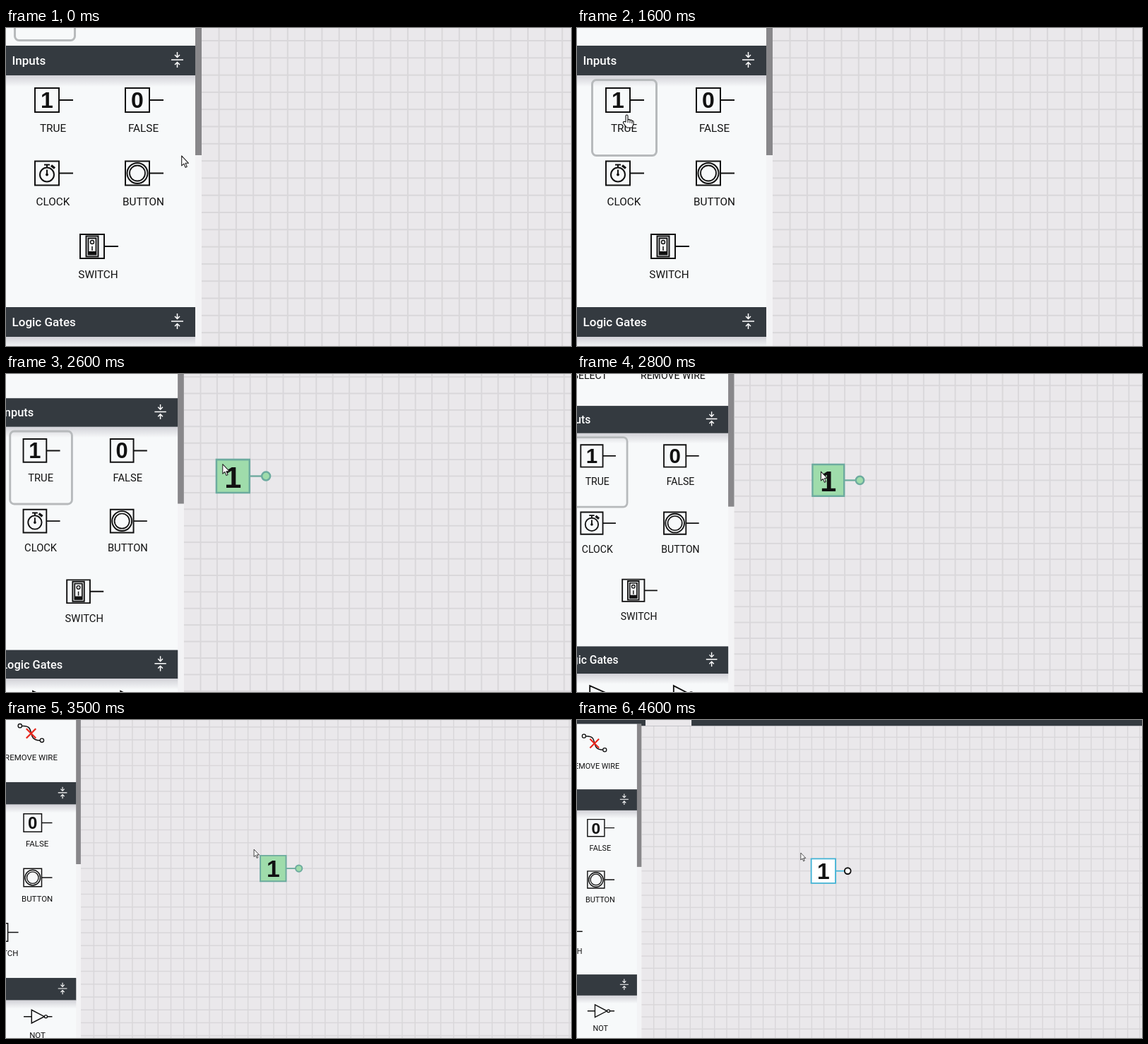
Recreate the animation shown at these times as an HTML page with a canvas. Size 800x450 px, loop 4700 ms.

```html
<!DOCTYPE html>
<html lang="en">
<head>
<meta charset="utf-8">
<title>Logic simulator</title>
<style>
  html, body { margin: 0; width: 100%; height: 100%; overflow: hidden; }
  canvas { display: block; width: 800px; height: 450px; }
</style>
</head>
<body>
<canvas id="stage" width="800" height="450"></canvas>
<script>
const ctx = document.getElementById('stage').getContext('2d');
const LOOP = 4700, CELL = 24.3, GRID_X = 398.8, GRID_Y = 115.2;
const SELECT_AT = 1500, RELEASE_AT = 3420, PLACE_AT = 3950;
const INK = '#111', DARK = '#343a40', PANEL = '#f7f9fa';

// Keyframes: time, then values
const zoomKeys = [[2430, 1], [2800, .92], [3200, .83], [3500, .749], [3670, .708]];
const cursorKeys = [
  [0, 249, 181], [300, 160, 142], [600, 75, 122], [700, 70.5, 123],
  [1800, 70.5, 123], [2100, 112, 118], [2400, 257, 118], [2800, 410.4, 126],
  [3200, 568.6, 149], [3400, 608, 154], [3500, 604.5, 152],
  [4000, 604.5, 152], [4300, 595.6, 152]
];

function at(keys, t) {
  if (t <= keys[0][0]) return keys[0].slice(1);
  for (let i = 1; i < keys.length; i++) {
    const a = keys[i - 1], b = keys[i];
    if (t < b[0]) {
      const p = (t - a[0]) / (b[0] - a[0]);
      return a.slice(1).map((v, k) => v + (b[k + 1] - v) * p);
    }
  }
  return keys[keys.length - 1].slice(1);
}

function fill(color, x, y, w, h) {
  ctx.fillStyle = color;
  ctx.fillRect(x, y, w, h);
}

function path(d, stroke, width = 2, inside) {
  const p = new Path2D(d);
  if (inside) { ctx.fillStyle = inside; ctx.fill(p); }
  if (stroke) { ctx.strokeStyle = stroke; ctx.lineWidth = width; ctx.stroke(p); }
}

function circle(x, y, r, stroke, width, inside) {
  ctx.beginPath();
  ctx.arc(x, y, r, 0, 7);
  if (inside) { ctx.fillStyle = inside; ctx.fill(); }
  ctx.strokeStyle = stroke;
  ctx.lineWidth = width;
  ctx.stroke();
}

function text(s, x, y, font, color = INK, align = 'center') {
  ctx.font = font;
  ctx.fillStyle = color;
  ctx.textAlign = align;
  ctx.fillText(s, x, y);
}

const label = (s, x, y) => text(s, x, y, '15.3px Roboto, sans-serif');
const digit = (s, x, y, size) =>
  text(s, x, y + size * .358, `bold ${size}px "Liberation Sans", Arial, sans-serif`);

function selection(x, y, w) {
  ctx.beginPath();
  ctx.roundRect(x, y, w, 107, 6);
  ctx.strokeStyle = '#b7babc';
  ctx.lineWidth = 3;
  ctx.stroke();
}

function drawGrid() {
  fill('#eae8eb', 277, -102, 1100, 1000);
  for (let x = GRID_X - 4 * CELL; x < 1300; x += CELL) fill('#d9d7da', x - 1, -102, 2, 1000);
  for (let y = GRID_Y - 8 * CELL; y < 800; y += CELL) fill('#d9d7da', 277, y - 1, 1100, 2);
}

function header(s, y) {
  const g = ctx.createLinearGradient(0, y + 42, 0, y + 58);
  g.addColorStop(0, 'rgba(60,50,75,.2)');
  g.addColorStop(1, 'rgba(60,50,75,0)');
  fill(g, 0, y + 42, 268, 16);
  fill(DARK, 0, y, 268, 42);
  text(s, 8.5, y + 27, '500 17px Roboto, sans-serif', '#fff', 'left');
  path(`M234 ${y + 20}H251M242.5 ${y + 9}V${y + 16}M239 ${y + 13}l3.5 3.5 3.5-3.5` +
    `M242.5 ${y + 31}V${y + 24}M239 ${y + 27}l3.5-3.5 3.5 3.5`, '#fff', 1.5);
}

// Boxed symbol with an output lead; x, y is the box centre
function input(name, x, y, symbol) {
  path(`M${x - 17} ${y - 17}h34v34h-34zM${x + 17} ${y}h20`, INK, 2);
  symbol(x, y);
  label(name, x + 8.5, y + 45);
}

function clock(x, y) {
  circle(x, y + 2, 10, INK, 2);
  circle(x, y + 2, 1.2, INK, 1.5, INK);
  path(`M${x} ${y + 2}v-7M${x} ${y - 8}v-3M${x - 4} ${y - 12}h8`, INK, 2);
  path(`M${x + 6} ${y - 11}l5 4`, INK, 3.5);
}

function button(x, y) {
  circle(x, y, 14.5, INK, 2);
  circle(x, y, 11, INK, 1.8);
}

function toggle(x, y) {
  path(`M${x - 8.5} ${y - 14.5}h17v29h-17z`, INK, 2);
  path(`M${x - 5.5} ${y - 11.5}h11v23h-11z`, INK, 1.8);
  circle(x, y - 6, 2.5, INK, 1.4);
  path(`M${x} ${y}v6`, INK, 1.5);
  fill(INK, x - 5.5, y + 7, 11, 5);
}

function gate(x, inverted) {
  const y = 468, tip = inverted ? x + 13 : x + 17;
  path(`M${x - 26} ${y}h15M${x + 17} ${y}h11M${x - 11} ${y - 12.5}L${tip} ${y}L${x - 11} ${y + 12.5}z`, INK, 2);
  if (inverted) circle(x + 16, y, 2.7, INK, 1.8, PANEL);
}

function drawSidebar(t) {
  fill(PANEL, 0, -106, 268, 1000);
  fill('#f3f3f5', 268, -106, 9, 1000);
  fill('#88878a', 268, -106, 9, 286);

  label('SELECT', 55, -16);
  label('REMOVE WIRE', 183, -16);
  path('M165 -81C194 -84 172 -54 200 -54', INK, 2);
  circle(162, -81.5, 3.6, INK, 1.8, PANEL);
  circle(203.5, -54, 3.6, INK, 1.8, PANEL);
  path('M174 -76l18 18M192 -76l-18 18', '#e8261c', 3);

  header('Inputs', 25);
  if (t < SELECT_AT) selection(12.5, -89.5, 85);
  else selection(21.5, 73.5, 91);
  input('TRUE', 58, 102, (x, y) => digit('1', x, y, 32));
  input('FALSE', 186, 102, (x, y) => digit('0', x, y, 32));
  input('CLOCK', 58, 205.5, clock);
  input('BUTTON', 186, 205.5, button);
  input('SWITCH', 122, 309, toggle);

  header('Logic Gates', 395);
  gate(66, false);
  gate(195, true);
  label('NOT', 195, 508);
}

function drawTopBar() {
  fill(DARK, 0, -200, 277, 94);
  fill(DARK, 277, -200, 1100, 98);
  fill('#eae8eb', 285, -200, 92, 98);
}

const snap = (v, base) => base + Math.round((v - base) / CELL) * CELL;

// The new part follows the pointer in grid steps until it is dropped
function drawPart(t) {
  const [cx, cy] = at(cursorKeys, Math.min(t - 40, RELEASE_AT));
  if (t < 2400 || cx < 285) return;
  const x = snap(cx, GRID_X) - 1, y = snap(cy, GRID_Y);
  const size = 2 * CELL, mid = y + CELL, placed = t >= PLACE_AT;
  const line = placed ? '#43b4d6' : '#6dab9f';
  const body = placed ? '#fff' : '#9fdcab';
  path(`M${x + size} ${mid}h${CELL - 6}`, line, 2.4);
  path(`M${x} ${y}h${size}v${size}h${-size}z`, line, 2.6, body);
  digit('1', x + CELL, mid + .5, 45);
  circle(x + 3 * CELL, mid, 6.2, placed ? INK : line, 2.6, body);
}

function drawCursor(t) {
  const [x, y] = at(cursorKeys, t);
  const overItem = y > 72 && y < 182 && (x > 20 && x < 114 || x > 148 && x < 242);
  ctx.save();
  ctx.translate(x, y);
  ctx.lineJoin = 'round';
  if (overItem) {
    path('M-1.5 10V1.5Q-1.5 0 0 0T1.5 1.5V7Q4 5.5 4.5 7.5Q7 6.5 7.3 8.5Q9.5 8 9.5 10V13L7.5 18H0L-5 11.5Q-5.5 9 -3 9.5Z', INK, 1.1, '#fff');
    path('M1.5 7v4M4.5 8v3.5M7.3 9v3', INK, 1);
  } else {
    path('M0 0V14L3.2 11.2 5.4 16.5 7.6 15.5 5.4 10.4H9.8Z', '#222', 1.1, '#fff');
  }
  ctx.restore();
}

function draw(now) {
  const t = now % LOOP;
  const [s] = at(zoomKeys, t);
  // Zoom about a fixed point, held inside the right edge
  const tx = Math.max(-404 * (1 - s), 800 - 1278 * s);
  const ty = 275.5 * (1 - s);
  ctx.setTransform(s, 0, 0, s, tx, ty);
  drawGrid();
  drawSidebar(t);
  drawTopBar();
  drawPart(t);
  drawCursor(t);
}

const start = performance.now();
function frame() {
  draw(performance.now() - start);
  requestAnimationFrame(frame);
}
frame();
</script>
</body>
</html>
```
